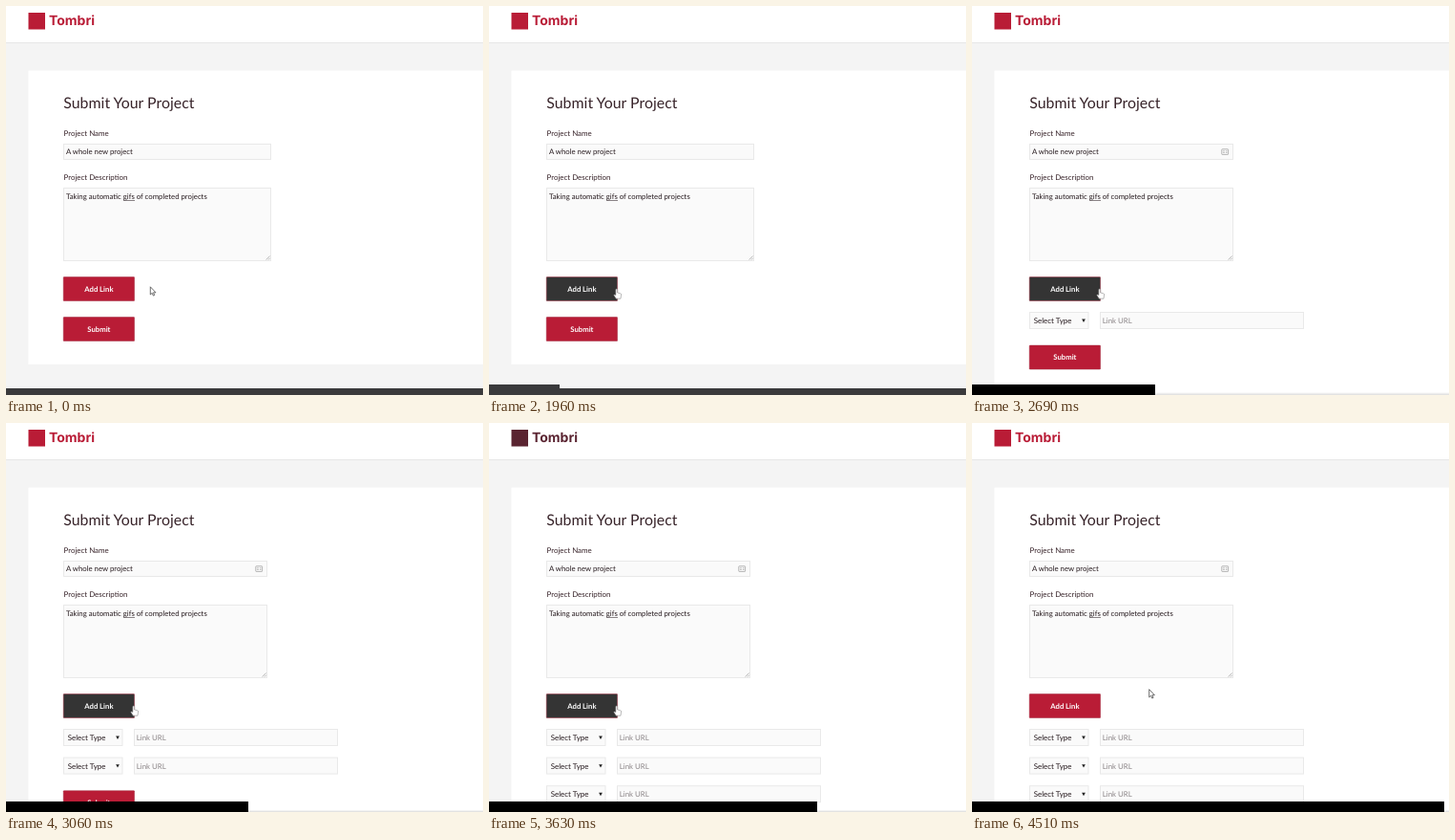
Write an HTML page that moves like this. It is 500 px wide and 407 px high and loops after 6040 ms.

```html
<!DOCTYPE html>
<html lang="en">
<head>
<meta charset="utf-8">
<title>Project form</title>
<style>
  html, body { margin: 0; width: 100%; height: 100%; overflow: hidden; background: #fff; }
  svg { display: block; width: 100vw; height: 100vh; }
  text { font: 7.93px Lato, sans-serif; fill: #38242a; text-rendering: geometricPrecision; white-space: pre; }
  .title { font-size: 15.9px; }
  .brand { font: 700 14px Inter, sans-serif; fill: inherit; }
  .value { font-size: 7.78px; fill: #261a1e; }
  .option { font-size: 7.95px; }
  .hint { font-size: 7.85px; fill: #8b8587; }
  .label { font-size: 7.7px; font-weight: 700; fill: #fff; text-anchor: middle; }
  .field { fill: #fafafa; stroke: #e9e9e9; }
  .button { stroke: #a02a3e; stroke-width: .5; }
</style>
</head>
<body>
<svg id="stage" viewBox="0 0 500 407">
  <rect width="500" height="407" fill="#f4f4f4"/>
  <rect width="500" height="38" fill="#fff"/>
  <rect y="38" width="500" height="1" fill="#e6e6e6"/>
  <g id="brand">
    <rect x="23.5" y="7" width="17.5" height="17.5"/>
    <text class="brand" x="45" y="19.5">Tombri</text>
  </g>
  <rect id="card" x="23.5" y="67.6" width="477" fill="#fff"/>

  <text class="title" x="60.3" y="107">Submit Your Project</text>
  <text x="60.5" y="136">Project Name</text>
  <rect id="nameField" class="field" x="60.5" y="144.5" height="16"/>
  <text class="value" x="63" y="155.3">A whole new project</text>
  <g id="fillIcon" fill="none" stroke="#a3a3a3" stroke-width=".8">
    <rect x="261.8" y="149.8" width="6.8" height="5.6" rx=".5"/>
    <path d="M263.2 151.8h1.6M263.2 153.4h1.6M266 151.8h1.4M266 153.4h1.4"/>
  </g>
  <text x="60.5" y="182.3">Project Description</text>
  <rect id="textField" class="field" x="60.5" y="190.5" height="76"/>
  <text class="value" x="63" y="202">Taking automatic gifs of completed projects</text>
  <path d="M123 203.5h12" stroke="#6d6467" stroke-width=".8"/>
  <path id="grip" d="M0 0l-4 4M0 2.3l-1.7 1.7" stroke="#999" stroke-width=".7"/>

  <rect id="add" class="button" x="60.2" y="283.5" width="74.4" height="25" rx=".6"/>
  <text class="label" x="97.4" y="298.8">Add Link</text>
  <g id="rows"></g>
  <g id="submit">
    <rect class="button" x="60.2" y="325.5" width="74.4" height="25" rx=".6" fill="#b91c36"/>
    <text class="label" x="97.4" y="340.8">Submit</text>
  </g>

  <rect id="footer" y="400" width="500" height="7" fill="#3a3a3c"/>
  <rect id="edge" y="405.6" width="500" height="1.4" fill="#e2e2e2"/>
  <path id="arrow" d="M0 0v8.2l1.9-1.7 1.2 2.8 1.3-.6-1.2-2.7h2.5z" fill="#fff" stroke="#4a4a4a" stroke-width=".8"/>
  <path id="hand" d="M-.9.6q.9-1.2 1.8 0V4l3 .7q1 .3.9 1.3l-.6 4.2h-4.7l-2.4-3.6q.3-1.3 2-.1z" fill="#fff" stroke="#8a8a8a" stroke-width=".6"/>
  <rect id="bar" y="396" height="11"/>
</svg>
<script>
const LOOP = 6040, LAST = 88, ROW = 29.6;
const RED = [185, 28, 54], DARK = [52, 52, 52];
const ROW_STEPS = [15, 36, 50];
const ICON_STEP = 30;

// [time in ms, step] pairs that pace the recording
const PACE = [[1530, 1], [2120, 18], [2150, 19], [2340, 24], [2740, 36], [2780, 37], [3060, 45],
  [3380, 55], [3410, 56], [3630, 61], [4000, 73], [4030, 74], [4080, 75], [4510, LAST]];
// [step, value] pairs
const POINTER_X = [[0, 151.3], [1, 150.5], [10, 133.8], [76, 133.8], [86, 185.7]];
const POINTER_Y = [[0, 293.8], [1, 295], [10, 296], [76, 296], [86, 278.7]];
const HOVER = [[8, 0], [13, 1], [77, 1], [83, 0]];

const ui = {};
document.querySelectorAll("[id]").forEach(el => ui[el.id] = el);

const set = (el, name, value) => el.setAttribute(name, value);
const show = (el, on) => set(el, "visibility", on ? "visible" : "hidden");
const move = (el, x, y) => set(el, "transform", `translate(${x} ${y})`);
const mix = (a, b, k) => `rgb(${a.map((v, i) => Math.round(v + (b[i] - v) * k))})`;

function track(keys, at) {
  if (at <= keys[0][0]) return keys[0][1];
  const i = keys.findIndex(k => k[0] > at);
  if (i < 0) return keys[keys.length - 1][1];
  const [a, from] = keys[i - 1], [b, to] = keys[i];
  return from + (to - from) * (at - a) / (b - a);
}

ui.rows.innerHTML = ROW_STEPS.map((_, i) => `
  <g transform="translate(0 ${i * ROW})">
    <rect class="field" x="60.5" y="320.5" width="61.5" height="17"/>
    <text class="value option" x="64.7" y="332.2">Select Type</text>
    <path d="M115.1 327.6h3.8l-1.9 3.4z" fill="#222"/>
    <rect class="field" x="134.5" y="320.5" width="213" height="17"/>
    <text class="hint" x="136.8" y="332.2">Link URL</text>
  </g>`).join("");

function brandColor(step) {
  if (step < ROW_STEPS[2] || step > 82) return mix(RED, RED, 0);
  return step < 63 ? "#5a2431" : "#7a2030";
}

function draw(time) {
  const step = time < PACE[0][0] ? 0 : Math.floor(track(PACE, time) + 1e-6);
  const rows = ROW_STEPS.filter(s => step >= s).length;
  const right = rows ? 273.5 : 277.5;

  set(ui.brand, "fill", brandColor(step));
  set(ui.card, "height", 307.4 + rows * ROW);
  set(ui.nameField, "width", right - 60.5);
  set(ui.textField, "width", right - 60.5);
  move(ui.grip, right - 0.8, 261.5);
  show(ui.fillIcon, step >= ICON_STEP);
  show(ui.footer, !rows);
  show(ui.edge, rows);
  [...ui.rows.children].forEach((row, i) => show(row, i < rows));
  move(ui.submit, 0, rows * ROW);

  const hover = track(HOVER, step);
  set(ui.add, "fill", mix(RED, DARK, hover));

  const x = track(POINTER_X, step), y = track(POINTER_Y, step);
  const over = x < 135;
  show(ui.arrow, !over);
  show(ui.hand, over);
  move(over ? ui.hand : ui.arrow, x, y);

  set(ui.bar, "width", Math.ceil(step * 495 / LAST));
  set(ui.bar, "fill", rows ? "#000" : "#3a3a3c");
}

const start = performance.now();
function tick() {
  draw((performance.now() - start) % LOOP);
  requestAnimationFrame(tick);
}
tick();
</script>
</body>
</html>
```
